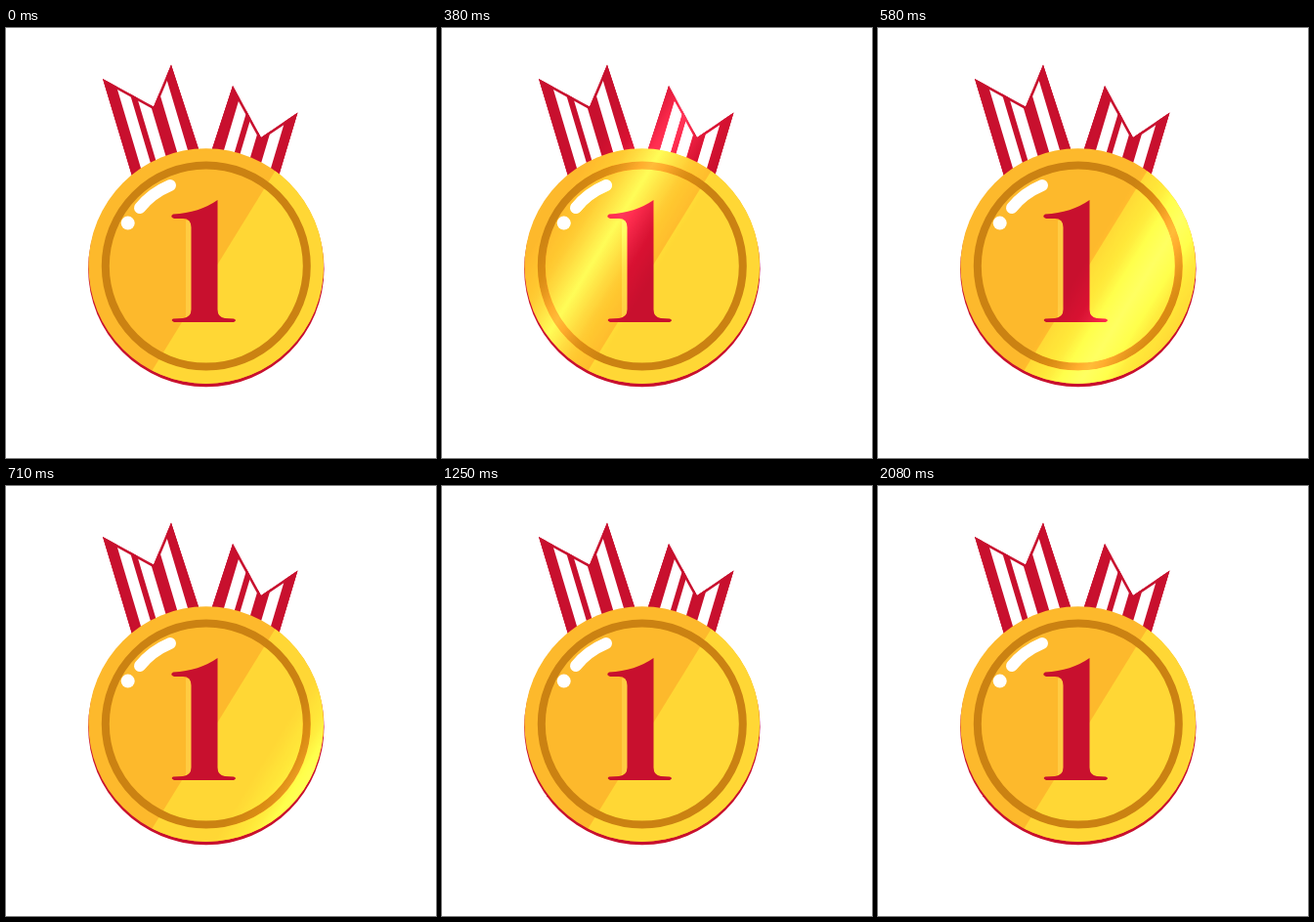
Recreate the animation shown at these times as an HTML page. Size 440 by 440 pixels, loop 2.12 s.

```html
<!DOCTYPE html>
<html lang="en">
<head>
<meta charset="utf-8">
<title>First place medal</title>
<style>
  html, body { margin: 0; width: 100%; height: 100%; overflow: hidden; background: #fff; }
  svg { display: block; width: 100vw; height: 100vh; }
  .dodge { mix-blend-mode: color-dodge; }
</style>
</head>
<body>
<svg viewBox="0 0 440 440" role="img" aria-label="1">
  <defs>
    <path id="left" d="M99 52 151 80.500 169 37.500 203 142 133 165Z"/>
    <path id="right" d="M232 59 261 112 298.500 86.500 275 165 204 145Z"/>
    <circle id="disc" cx="204.700" cy="243.600" r="120.300"/>
    <clipPath id="leftClip"><use href="#left"/></clipPath>
    <clipPath id="rightClip"><use href="#right"/></clipPath>
    <clipPath id="discClip"><use href="#disc"/></clipPath>
    <clipPath id="medalClip">
      <use href="#left"/><use href="#right"/><use href="#disc"/>
    </clipPath>
    <path id="stripes" d="M101 30v130M118.700 30v130M143 30v130" stroke="#fff" stroke-width="11.500"/>
    <linearGradient id="glow">
      <stop offset="0" stop-color="#000"/>
      <stop offset=".25" stop-color="#181818"/>
      <stop offset=".5" stop-color="#444"/>
      <stop offset=".75" stop-color="#181818"/>
      <stop offset="1" stop-color="#000"/>
    </linearGradient>
    <linearGradient id="haze">
      <stop offset=".2" stop-color="#fff" stop-opacity="0"/>
      <stop offset=".5" stop-color="#fff" stop-opacity=".14"/>
      <stop offset=".8" stop-color="#fff" stop-opacity="0"/>
    </linearGradient>
    <rect id="band" x="-60" y="-400" width="120" height="800"/>
  </defs>

  <g fill="#c8102e" stroke="#c8102e">
    <g clip-path="url(#leftClip)">
      <use href="#left"/>
      <use href="#stripes" transform="skewX(16.600)"/>
      <use href="#left" fill="none" stroke-width="5"/>
    </g>
    <g clip-path="url(#rightClip)">
      <use href="#right"/>
      <use href="#stripes" transform="translate(165 0) skewX(-16.600)"/>
      <use href="#right" fill="none" stroke-width="5"/>
    </g>
  </g>

  <circle cx="204.800" cy="246.500" r="120.700" fill="#c8102e"/>
  <use href="#disc" fill="#fdb92c"/>
  <path d="M283 134 119 400H340V134Z" fill="#ffd735" clip-path="url(#discClip)"/>
  <circle cx="204.800" cy="243.600" r="103" fill="none" stroke="#cb8212" stroke-width="8"/>
  <path d="M137 184Q149 169 168 161" fill="none" stroke="#fff" stroke-width="12" stroke-linecap="round"/>
  <circle cx="124.700" cy="199.600" r="7" fill="#fff"/>
  <path d="M184 197V294H190V197Z" fill="#ffcb42"/>
  <path fill="#c8102e" d="M216.500 176V288Q216.500 296 224 297L233 297.500Q237 299 233 301H172Q168 299 171 297.500L181 297Q189.500 296 189.500 288V204Q189.500 195 181 195H172Q167 193 171 190.500Q198 189 216.500 176Z"/>

  <g class="dodge" clip-path="url(#medalClip)">
    <use class="sweep" href="#band" fill="url(#glow)"/>
  </g>
  <g clip-path="url(#medalClip)">
    <use class="sweep" href="#band" fill="url(#haze)"/>
  </g>
</svg>
<script>
  const LOOP = 2120, FPS = 0.024, TILT = 31.6;
  const bands = document.querySelectorAll(".sweep");

  function draw(now) {
    const t = Math.floor((now % LOOP + 4) * FPS) / FPS;
    const reach = 60 + 0.525 * t; // distance swept across the medal
    for (const band of bands) {
      band.setAttribute("transform", `rotate(${TILT}) translate(${reach} 0)`);
    }
    requestAnimationFrame(draw);
  }
  draw(0);
</script>
</body>
</html>
```
